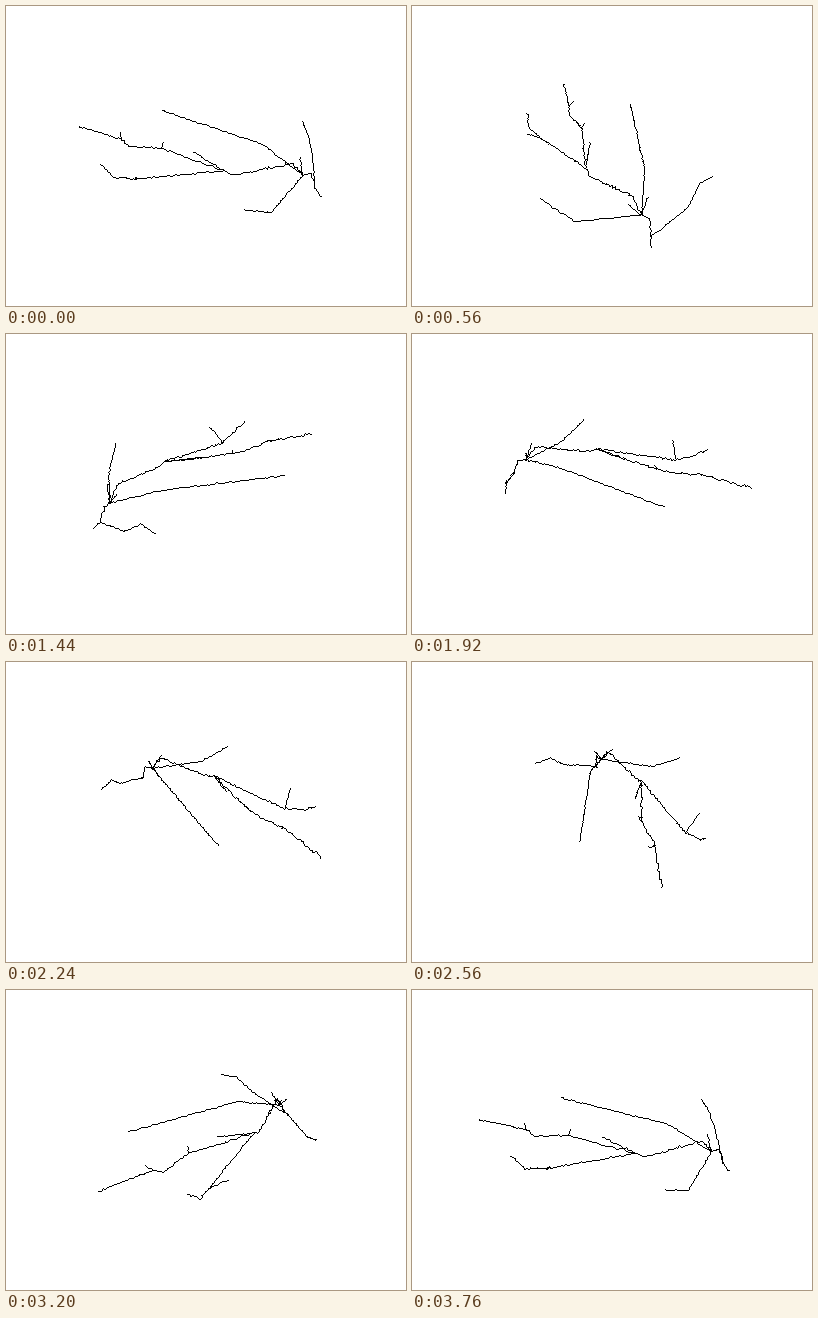
These frames come from a looping animation (400x300 px, 3.84 s). An HTML page with a canvas:

```html
<!DOCTYPE html>
<html lang="en">
<head>
<meta charset="utf-8">
<title>Rotating neuron</title>
<style>
html, body { margin: 0; width: 100%; height: 100%; overflow: hidden; background: #fff; }
canvas { display: block; }
</style>
</head>
<body>
<canvas id="stage" width="400" height="300"></canvas>
<script>
const ctx = document.getElementById('stage').getContext('2d');
const STEP = 80, STEPS = 48;
const TILT = 35 * Math.PI / 180, DIST = 600;
const SIN = Math.sin(TILT), COS = Math.cos(TILT);
const THICK = 1.7, THIN = 1;

let seed = 7;
function rand() {
  seed = (seed * 16807) % 2147483647;
  return seed / 2147483647;
}

// Runs a neurite through its bends in tiny wobbling pieces.
const paths = [];
function grow(wobble, ...bends) {
  const path = [bends[0]];
  for (let i = 1; i < bends.length; i++) {
    const a = bends[i - 1], b = bends[i];
    const n = Math.ceil(Math.hypot(b[0] - a[0], b[1] - a[1], b[2] - a[2]) / 2);
    for (let j = 1; j <= n; j++) {
      path.push(a.map((v, k) => v + (b[k] - v) * j / n + (rand() - 0.5) * wobble));
    }
  }
  paths.push(path);
}

// Joints in space: right, towards the viewer, up.
const fork = [104, 38, -11];
const neck = [91, 38, 5];
const crown = [16.5, 44, 14.5];
const knee = [-44, 6, 14];
const spur = [-85, -6, 17];
const split = [-67, 41, 3];

grow(THICK, [110, 42, -17], fork, [99, 36, 5], neck, [79, 40, 20], [25, 45, 10.5], crown);
grow(THICK, crown, [-14, 25, 14], knee, [-77, 0, 12], spur, [-131, -30, 17]);
grow(THICK, crown, split, [-87, 44, 7], [-98, 38, 18]);
grow(THIN, neck, [55, 5, 18], [-47, -60.6, 17.5]);
grow(THIN, neck, [57, 85, -1], [32, 103, 17]);
grow(THIN, fork, [106, -3, 2.6], [101, -20, 18], [99.5, -38, 17]);

// Short side twigs.
grow(THIN, knee, [-42, 4, 20]);
grow(THIN, spur, [-86, -13, 20]);
grow(THIN, crown, [-12, 19, 18]);
grow(THIN, split, [-64, 58, 17]);
grow(THIN, neck, [88, 29, 18.5]);
grow(THIN, neck, [85, 48.5, 18]);

function project([x, y, z], c, s) {
  const side = x * c - y * s, near = x * s + y * c;
  const scale = DIST / (DIST - near * COS - z * SIN);
  return [
    Math.round(200 + side * scale),
    Math.round(150 + (near * SIN - z * COS) * scale)
  ];
}

// Hard-edged line without smoothing.
function line([x0, y0], [x1, y1]) {
  const n = Math.max(1, Math.abs(x1 - x0), Math.abs(y1 - y0));
  for (let i = 0; i <= n; i++) {
    ctx.fillRect(Math.round(x0 + (x1 - x0) * i / n), Math.round(y0 + (y1 - y0) * i / n), 1, 1);
  }
}

function draw(step) {
  const turn = 2 * Math.PI * step / STEPS;
  const c = Math.cos(turn), s = Math.sin(turn);
  ctx.fillStyle = '#fff';
  ctx.fillRect(0, 0, 400, 300);
  ctx.fillStyle = '#000';
  for (const path of paths) {
    const pts = path.map(p => project(p, c, s));
    for (let i = 1; i < pts.length; i++) line(pts[i - 1], pts[i]);
  }
}

const start = performance.now();
function tick() {
  draw(Math.floor((performance.now() - start) / STEP) % STEPS);
  requestAnimationFrame(tick);
}
tick();
</script>
</body>
</html>
```
